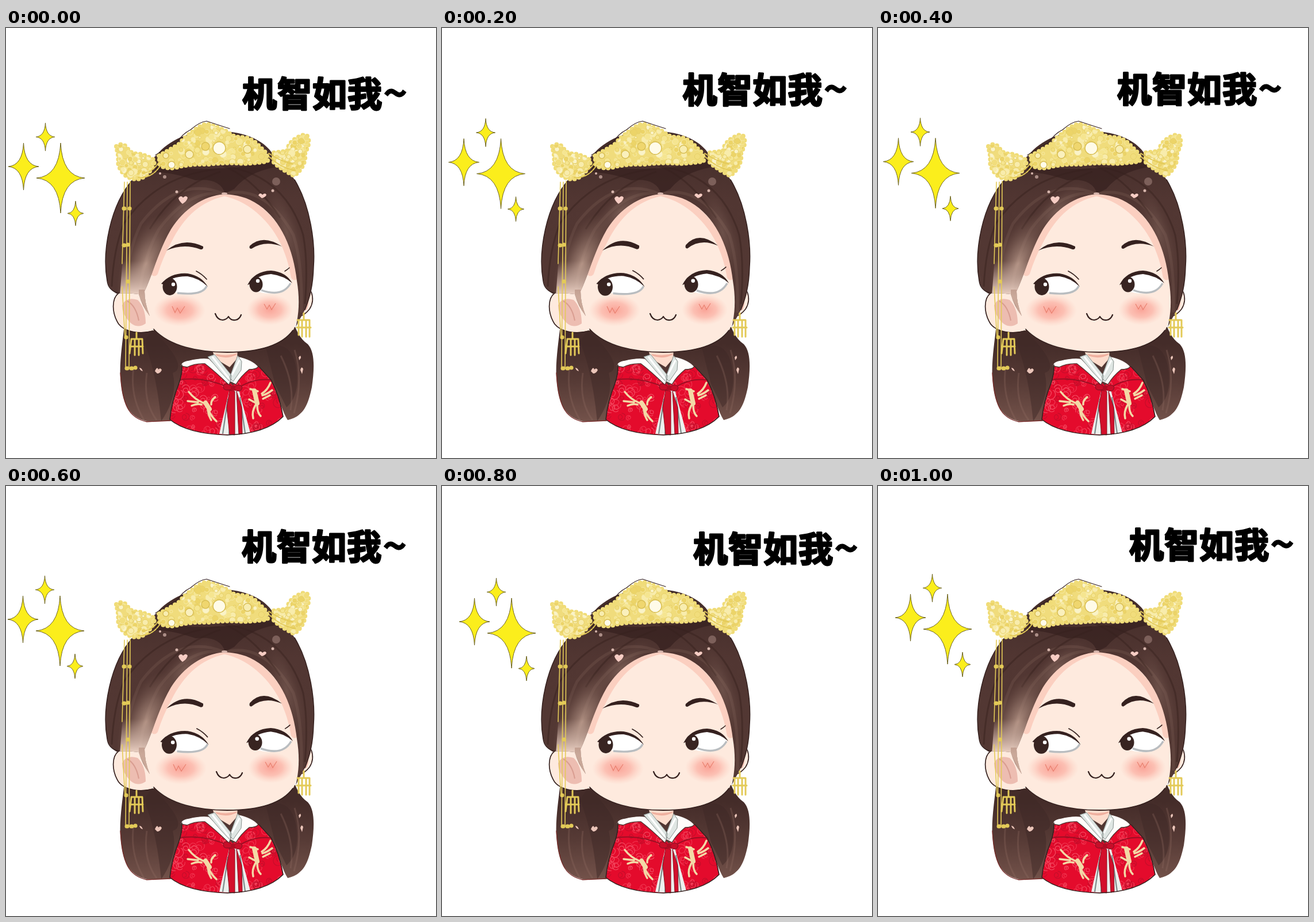
Recreate the animation shown at these times as an HTML page. Size 748x748 px, loop 1200 ms.

```html
<!DOCTYPE html>
<html lang="zh">
<head>
<meta charset="utf-8">
<title>机智如我~</title>
<style>
  html, body { margin: 0; width: 100%; height: 100%; overflow: hidden; background: #fff; }
  svg { display: block; width: 100vw; height: 100vh; }
  .caption { font-family: "Noto Sans CJK SC", "Noto Sans CJK", sans-serif; font-weight: 900; stroke: #000; stroke-width: 3; stroke-linejoin: round; }
  .line { fill: none; stroke: #35211f; stroke-linecap: round; stroke-linejoin: round; }
  .gold { fill: none; stroke: #e3ca58; stroke-linecap: round; }
</style>
</head>
<body>
<svg viewBox="0 0 748 748">
  <defs>
    <linearGradient id="hairFill" x1="0" y1="0" x2="0" y2="1">
      <stop offset="0" stop-color="#412b28"/><stop offset=".35" stop-color="#513632"/><stop offset="1" stop-color="#543934"/>
    </linearGradient>
    <linearGradient id="backFill" x1="0" y1="0" x2="0" y2="1">
      <stop offset=".2" stop-color="#442c29"/><stop offset=".6" stop-color="#573b36"/><stop offset="1" stop-color="#73524a"/>
    </linearGradient>
    <linearGradient id="fade" gradientUnits="userSpaceOnUse" x1="0" y1="405" x2="0" y2="466">
      <stop offset="0" stop-color="#e9cbbb" stop-opacity="0"/><stop offset="1" stop-color="#f8ded0" stop-opacity=".95"/>
    </linearGradient>
    <radialGradient id="glow">
      <stop offset="0" stop-color="#c3a292" stop-opacity=".8"/><stop offset=".45" stop-color="#a28275" stop-opacity=".5"/><stop offset="1" stop-color="#7a5a50" stop-opacity="0"/>
    </radialGradient>
    <radialGradient id="blush">
      <stop offset="0" stop-color="#f9978b" stop-opacity=".85"/><stop offset=".5" stop-color="#fba99c" stop-opacity=".65"/><stop offset="1" stop-color="#fdc4b5" stop-opacity="0"/>
    </radialGradient>
    <path id="hair" d="M176,440C167,390 180,308 222,262Q240,240 261,222C285,193 320,180 358,179C405,178 447,190 466,222Q488,242 502,264C530,310 538,375 535,415C534,450 528,470 520,490L504,520C510,495 511,470 506,440C500,385 479,335 440,308C420,294 400,290 380,289C343,292 310,314 287,350C263,392 257,425 241,458Q241,478 250,501Q237,484 231,463Q210,460 192,462Q179,455 176,440Z"/>
    <path id="back" d="M206,515C203,545 197,580 199,610C202,650 211,676 245,684Q275,685 300,682L478,655Q484,673 490,682C520,675 526,652 532,625C537,590 537,563 525,550Q512,542 503,520L400,540Z"/>
    <path id="cape" d="M306,586Q330,576 348,580L395,622L412,594L440,589L461,612Q476,640 482,676Q452,706 385,708Q315,706 285,681Q288,650 301,618Q307,600 306,586Z"/>
    <path id="tiara" d="M266,222Q283,213 300,203Q312,189 323,182Q337,169 350,167Q370,173 386,181Q396,192 416,190Q434,196 442,208Q456,217 455,232Q440,234 415,236Q385,233 352,237Q318,236 294,243Q278,245 268,239Z"/>
    <path id="wings" d="M192,206Q203,198 211,209Q217,220 232,219Q247,223 258,230Q259,242 241,258Q225,269 206,255Q192,240 196,226ZM466,217L489,214Q491,199 508,190Q524,181 526,193Q528,204 520,217Q523,240 501,257Q487,250 466,235Z"/>
    <clipPath id="hairClip"><use href="#hair"/></clipPath>
    <clipPath id="capeClip"><use href="#cape"/></clipPath>
    <clipPath id="tiaraClip"><use href="#tiara"/></clipPath>
    <clipPath id="wingsClip"><use href="#wings"/></clipPath>
  </defs>

  <!-- long hair behind -->
  <use href="#back" fill="url(#backFill)"/>
  <path d="M255,525Q320,590 290,600Q300,640 270,684Q262,600 240,545ZM452,555Q500,540 506,600Q510,640 488,660L468,620Z" fill="#3f2826" opacity=".5"/>
  <path d="M222,590Q215,640 240,682M245,600Q238,650 262,682M502,560Q518,610 501,670M478,570Q503,620 495,665" fill="none" stroke="#8f6b61" stroke-width="3" opacity=".3"/>
  <path class="line" d="M199,600C203,655 212,678 245,685L286,683" stroke-width="1.3" style="stroke:#7a2d2b"/>
  <path d="M232,591q4,0 6,6q-5,-1 -6,-6ZM259,597q4,-9 6,-3q4,-4 6,1q-3,6 -8,6ZM509,573q4,-6 4,1l-3,4ZM512,595q2,-8 5,-2l-2,9Z" fill="#ebc5b9"/>

  <!-- neck and robe -->
  <path d="M357,556L403,556L402,575L389,590L364,575Z" fill="#fddccc"/>
  <path d="M365,567Q384,572 402,566L400,569Q383,577 366,570Z" fill="#efb09f"/>
  <use href="#cape" fill="#e40b2c"/>
  <g id="roses" clip-path="url(#capeClip)" fill="none"></g>
  <path d="M303,612Q345,606 386,625M462,612Q430,609 406,625" fill="none" stroke="#9b1024" stroke-width="2"/>
  <path d="M388,632L371,706Q398,709 425,704L405,630Z" fill="#edf0ee"/>
  <path d="M386,645L377,706M392,642L388,707M407,642L416,705" stroke="#7e8d8c" stroke-width="2.2" fill="none"/>
  <path d="M389,630L384,660L389,707L398,708L398,632ZM401,632L405,707L411,706L410,660Z" fill="#d30f2b" stroke="#8e1021"/>
  <path d="M304,588Q304,580 318,578Q339,573 353,575L391,612L388,621Q362,596 346,584Q329,583 315,590ZM403,571Q430,577 439,589Q435,594 423,594Q409,605 400,620L390,615Z" fill="#fffdfb" stroke="#4d3430" stroke-width="1.3"/>
  <path d="M351,572L363,568L392,604L390,616L374,599ZM403,570L410,580L409,595L395,615L389,608Z" fill="#dfe6e3" stroke="#87918e"/>
  <path d="M359,572L388,610M406,578L393,604" stroke="#fff" stroke-width="3"/>
  <path d="M395,625Q379,613 378,625Q379,633 395,628Q409,637 411,625Q407,617 395,625Z" fill="#c70e29" stroke="#831022"/>
  <circle cx="395" cy="626" r="4" fill="#ad0d24"/>
  <g fill="none" stroke="#f3d9a6" stroke-linecap="round">
    <path stroke-width="3.5" d="M318,633Q328,646 343,652M316,649L334,651M323,657Q332,653 340,655M364,642Q356,648 357,655M351,662Q357,676 366,684M351,664Q353,676 357,682"/>
    <path stroke-width="8" d="M347,652L354,663"/>
    <path stroke-width="3.5" d="M460,617Q455,630 445,636M463,630Q454,637 446,639M459,639L447,645M425,628L438,632M423,646L434,652M434,656Q427,668 430,679M437,657Q437,669 443,675"/>
    <path stroke-width="8" d="M432,631L437,653"/>
  </g>
  <path class="line" d="M306,586Q307,600 301,618Q288,650 285,681Q315,706 385,708Q452,706 482,676Q476,640 461,612L440,589" stroke-width="1.6"/>

  <!-- ears and face -->
  <path d="M200,459C184,465 183,495 196,515C207,529 233,533 257,526L260,440L215,440Z" fill="#feeade"/>
  <path d="M202,482Q209,467 229,473Q243,487 243,514Q230,523 218,514Q202,500 202,482Z" fill="#edbdb1"/>
  <path d="M211,475Q226,483 231,509" fill="none" stroke="#d99d91" stroke-width="2"/>
  <path class="line" d="M196,461C184,470 183,495 196,515C207,529 233,533 255,527" stroke-width="1.7"/>
  <path d="M512,458L531,458Q537,475 528,489Q520,502 508,505Z" fill="#feeade"/>
  <path d="M521,469Q530,473 523,490L514,494Z" fill="#efbbad"/>
  <path class="line" d="M531,459Q537,475 528,489Q520,499 512,501" stroke-width="1.6"/>
  <path d="M238,440C240,488 247,511 258,525C285,554 335,564 385,564C440,564 481,551 500,525C516,490 518,440 515,400C490,320 440,280 380,275C320,280 275,320 250,400Z" fill="#feeade"/>
  <path class="line" d="M257,524C285,554 335,564 385,564C440,564 480,552 499,526" stroke-width="1.8"/>
  <path d="M380,286C335,296 305,324 283,367Q267,396 258,425M380,286C432,297 473,340 491,390Q498,408 502,432" fill="none" stroke="#fbc9b9" stroke-width="13" stroke-linecap="round" opacity=".8"/>

  <g id="cheeks">
    <ellipse cx="302" cy="491" rx="45" ry="28" fill="url(#blush)"/>
    <ellipse cx="459" cy="490" rx="40" ry="27" fill="url(#blush)"/>
    <path d="M289,484l5,11l4,-8l5,9l8,-12M449,480l5,9l4,-7l4,8l7,-11" fill="none" stroke="#e9806f" stroke-width="1.2"/>
  </g>
  <path id="mouth" class="line" d="M364,497Q368,508 377,508Q384,507 387,502Q391,509 399,508Q406,507 409,499" stroke-width="2.2"/>

  <g id="leftEye">
    <path d="M274,445Q288,430 315,429Q338,433 350,450Q345,462 320,462Q286,465 274,445Z" fill="#fff"/>
    <path d="M298,461Q342,466 349,449" fill="none" stroke="#b9bdc0" stroke-width="3.4"/>
    <ellipse cx="285" cy="450" rx="12.5" ry="15" fill="#382421"/>
    <circle cx="291" cy="446" r="3.2" fill="#fff"/>
    <path d="M270,445Q287,425 316,427Q340,431 351,450Q336,435 316,432Q289,431 274,446Z" fill="#35211f"/>
    <path class="line" d="M331,423Q341,428 349,437" stroke-width="1.7"/>
  </g>
  <g id="rightEye">
    <path d="M424,446Q435,429 462,427Q486,429 496,443Q488,459 470,461Q434,465 424,446Z" fill="#fff"/>
    <path d="M444,456Q481,469 495,444" fill="none" stroke="#b9bdc0" stroke-width="3.4"/>
    <ellipse cx="435" cy="446" rx="11.5" ry="13.5" fill="#382421"/>
    <circle cx="438" cy="440" r="3.2" fill="#fff"/>
    <path d="M420,447Q432,423 461,422Q487,424 498,444Q484,431 461,428Q437,430 425,445Z" fill="#35211f"/>
    <path class="line" d="M485,423Q490,420 493,417" stroke-width="1.5"/>
  </g>
  <g id="brows" fill="#35211f">
    <path d="M279,387Q308,363 343,380Q344,386 338,385Q309,374 279,387Z"/>
    <path d="M424,379Q447,358 480,380Q450,369 427,384Q422,384 424,379Z"/>
  </g>

  <!-- front hair -->
  <use href="#hair" fill="url(#hairFill)"/>
  <g clip-path="url(#hairClip)">
    <path d="M380,289Q300,255 235,340Q210,390 207,465M380,289Q320,278 266,350Q238,400 232,466M380,289Q450,270 500,360Q516,410 514,495" fill="none" stroke="#7c5c53" stroke-width="5" opacity=".3"/>
    <path d="M372,245Q263,255 205,340Q187,385 184,450M373,250Q295,275 250,350M378,240Q485,255 517,360Q526,410 520,480M378,240Q430,260 477,330" fill="none" stroke="#38221f" stroke-width="3" opacity=".5"/>
    <path d="M260,238Q360,255 460,232L469,242Q420,251 397,280L381,288Q372,260 330,265Q290,251 260,251Z" fill="#35201e" opacity=".65"/>
    <ellipse cx="244" cy="410" rx="42" ry="92" fill="url(#glow)" transform="rotate(22 244 410)"/>
    <ellipse cx="310" cy="318" rx="70" ry="24" fill="url(#glow)" opacity=".4" transform="rotate(-42 310 318)"/>
    <ellipse cx="488" cy="355" rx="24" ry="85" fill="url(#glow)" opacity=".3" transform="rotate(-18 488 355)"/>
    <path d="M203,400H262L250,505L231,466H198Z" fill="url(#fade)"/>
    <path d="M231,455L241,455Q241,478 250,501Q237,484 231,463Z" fill="#b99485" opacity=".7"/>
  </g>
  <path class="line" d="M196,461Q178,457 176,440C167,390 180,308 222,262M502,264C530,310 538,375 535,415C534,450 528,470 520,490" stroke-width="1.5"/>
  <path d="M300,296q4,-6 8,-1q5,-5 8,0q-1,6 -9,11q-6,-5 -7,-10ZM439,291q3,-6 7,-1q5,-4 7,0q-1,4 -8,6Z" fill="#f7cdc4"/>
  <g fill="#d6b5ac">
    <circle cx="297" cy="285" r="2.5"/><circle cx="464" cy="283" r="2.5"/><ellipse cx="380" cy="288" rx="5" ry="2"/>
    <circle cx="470" cy="267" r="7" opacity=".35"/><circle cx="276" cy="259" r="3" opacity=".7"/><circle cx="268" cy="253" r="2"/>
  </g>

  <!-- headdress -->
  <g id="crown"></g>
  <g fill="#fffbe8" stroke="#d9bf55" stroke-width="1.5">
    <circle cx="371" cy="209" r="11"/><circle cx="347" cy="206" r="7" fill="#efd66e"/><circle cx="420" cy="211" r="7" fill="#f8edb0"/>
    <circle cx="319" cy="220" r="7" fill="#faf0bd"/><circle cx="288" cy="238" r="6"/><circle cx="278" cy="222" r="5" fill="#f8edb0"/>
  </g>
  <path class="line" d="M260,221Q278,210 297,199Q307,184 321,177Q337,163 349,162Q370,169 389,175" stroke-width="1.2"/>
  <path class="gold" d="M237,252Q255,252 267,232M230,260Q255,262 270,237M457,218Q478,232 500,237M458,224Q480,245 505,248" stroke-width="2" stroke-dasharray="4 2"/>

  <!-- tassels and earrings -->
  <g class="gold" stroke-width="1.6">
    <path d="M206,268L202,410M211,268L208,592M216,266L214,592M202,450L207,540"/>
    <path stroke-width="7" d="M205,314h1M215,314h.1M205,378h1M212,377h.1M212,441h.1M209,538h.1M210,592h1M218,592h1M225,591h.1"/>
    <path stroke-width="3" d="M227,530V540M218,541H237M218,541L215,566M224,541V569M231,541V569M237,541L238,566M216,554H238"/>
    <path stroke-width="3" d="M518,496V507M507,508H528M509,508V534M515,508V537M522,508V537M528,508V537M506,521H530"/>
  </g>

  <!-- sparkles and caption -->
  <g id="drift">
    <g id="stars" fill="#fbee1c" stroke="#6d6320" stroke-width="1"></g>
    <g class="caption">
      <text font-size="60" y="137"><tspan x="411">机</tspan><tspan x="472">智</tspan><tspan x="533">如</tspan><tspan x="594">我</tspan></text>
      <text font-size="72" x="656" y="140" stroke-width="1">~</text>
    </g>
  </g>
</svg>
<script>
const $ = id => document.getElementById(id);
const add = (parent, tag, attrs) => {
  const node = document.createElementNS("http://www.w3.org/2000/svg", tag);
  for (const key in attrs) node.setAttribute(key, attrs[key]);
  return parent.appendChild(node);
};

let seed = 11;
const rnd = (lo, hi) => {
  seed = (seed * 16807) % 2147483647;
  return lo + (hi - lo) * seed / 2147483647;
};
const pick = list => list[Math.floor(rnd(0, list.length))];

function star(x, y, w, h) {
  const a = w * 0.07, b = h * 0.05;
  add($("stars"), "path", {
    d: `M${x},${y - h}Q${x + a},${y - b} ${x + w},${y}Q${x + a},${y + b} ${x},${y + h}` +
       `Q${x - a},${y + b} ${x - w},${y}Q${x - a},${y - b} ${x},${y - h}Z`
  });
}
star(95, 261, 42, 61);
star(30.5, 241, 26.5, 41);
star(68.5, 189.5, 16.5, 24.5);
star(121, 322.5, 14, 21.5);

// Gold base with a beaded rim.
function base(id) {
  add($("crown"), "use", { href: "#" + id, fill: "#f0dc7c", stroke: "#f0dc78", "stroke-width": 8,
    "stroke-linecap": "round", "stroke-dasharray": "0 8" });
  return add($("crown"), "g", { "clip-path": `url(#${id}Clip)` });
}

function pearls(parent, count, x0, x1, y0, y1) {
  for (let i = 0; i < count; i++) {
    add(parent, "circle", {
      cx: rnd(x0, x1), cy: rnd(y0, y1), r: rnd(2, 6),
      fill: pick(["#f5e590", "#f8ecac", "#f1dd7c", "#faf3c8", "#ecd468"]),
      stroke: pick(["#e6cf68", "#f6e9a4"])
    });
  }
}
const wings = base("wings");
pearls(wings, 140, 188, 262, 196, 268);
pearls(wings, 140, 462, 530, 183, 262);
pearls(base("tiara"), 210, 262, 458, 165, 245);

// Swirled roses on the robe.
for (let i = 0; i < 110; i++) {
  const x = rnd(285, 482), y = rnd(588, 706), r = rnd(3, 9);
  add($("roses"), "path", {
    d: `M${x - r},${y}a${r},${r} 0 1 1 ${r},${r}q${-r},-2 ${-r * 0.4},${-r}q${r},-3 ${r},3`,
    stroke: pick(["#f34a60", "#f0334e", "#c50d2a"]), "stroke-width": 1.2,
    transform: `rotate(${rnd(0, 360)} ${x} ${y})`
  });
}

const STEP = 200;
const drift = [[0, 0], [7.5, -7.5], [5, -8.5], [-1, -9], [26, -5], [26, -12]];
const sway = [0, -2, -1, 2, 4, 2];

const move = (id, x, y) => $(id).setAttribute("transform", `translate(${x} ${y})`);
const grow = (id, cx, cy, kx, ky) =>
  $(id).setAttribute("transform", `translate(${cx} ${cy}) scale(${kx} ${ky}) translate(${-cx} ${-cy})`);

function draw(time) {
  const step = Math.floor(time / STEP) % drift.length;
  const wide = step % 2;
  move("drift", ...drift[step]);
  move("mouth", sway[step], 0);
  move("cheeks", sway[step], 0);
  grow("leftEye", 311, 446, wide ? 1.04 : 1, wide ? 1.04 : 1);
  grow("rightEye", 470, 444, wide ? 1.04 : 1, wide ? 1.04 : 1);
  grow("brows", 380, 387, 1, wide ? 1.2 : 1);
}

function loop() {
  draw(performance.now());
  requestAnimationFrame(loop);
}
loop();
</script>
</body>
</html>
```
